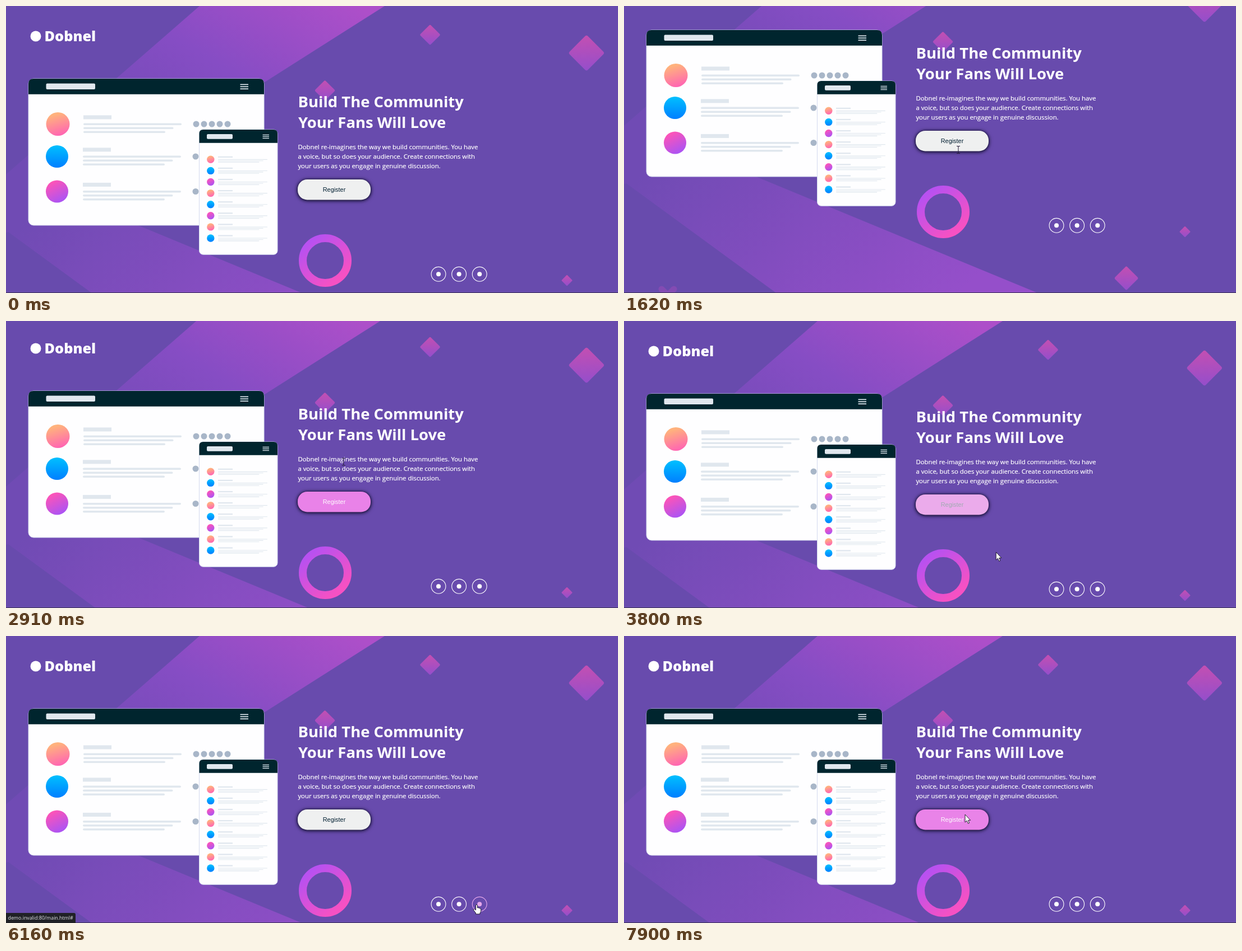
Animation, 1091 px wide and 513 px high, one loop 8000 ms. Source, as an HTML page:

```html
<!DOCTYPE html>
<html lang="en">
<head>
<meta charset="utf-8">
<title>Community landing page</title>
<style>
  html, body { margin: 0; width: 100%; height: 100%; overflow: hidden; background: #684bad; }
  svg { display: block; position: absolute; left: 0; top: 0; }
  text { font-family: "Open Sans", "Noto Sans", sans-serif; fill: #fff; white-space: pre; }
  .title { font-size: 27.45px; font-weight: 700; }
  .copy { font-size: 11.36px; stroke: #fff; stroke-width: .22px; }
  .brand { font-size: 25.3px; font-weight: 800; }
  .status { font-size: 8.8px; fill: #e4e6ea; }
  #label { font-family: "Liberation Sans", Arial, sans-serif; font-size: 10.9px; }
  #button { filter: drop-shadow(0 1px 3px rgba(8, 8, 32, .9)) drop-shadow(0 0 2px rgba(8, 8, 32, .5)); }
</style>
</head>
<body>
<svg width="1091" height="513" viewBox="0 0 1091 513">
  <defs>
    <linearGradient id="bandTop" gradientUnits="userSpaceOnUse" x1="560" y1="-40" x2="330" y2="330">
      <stop offset="0" stop-color="#ad4fc9"/><stop offset=".5" stop-color="#864dc4"/><stop offset="1" stop-color="#704bb4"/>
    </linearGradient>
    <linearGradient id="bandLow" gradientUnits="userSpaceOnUse" x1="90" y1="330" x2="480" y2="720">
      <stop offset="0" stop-color="#704bb4"/><stop offset="1" stop-color="#954fca"/>
    </linearGradient>
    <linearGradient id="gem" x1="0" y1="0" x2="0" y2="1">
      <stop offset="0" stop-color="#c34fb2"/><stop offset="1" stop-color="#954ecb"/>
    </linearGradient>
    <linearGradient id="ring" x1=".15" y1=".1" x2=".8" y2=".9">
      <stop offset="0" stop-color="#b851f0"/><stop offset="1" stop-color="#f651c3"/>
    </linearGradient>
    <linearGradient id="peach" x1=".35" y1="0" x2=".65" y2="1">
      <stop offset=".1" stop-color="#ffb27d"/><stop offset="1" stop-color="#ff62b4"/>
    </linearGradient>
    <linearGradient id="sky" x1="0" y1="0" x2="0" y2="1">
      <stop offset=".05" stop-color="#00bdff"/><stop offset="1" stop-color="#007fff"/>
    </linearGradient>
    <linearGradient id="orchid" x1=".25" y1="0" x2=".75" y2="1">
      <stop offset=".05" stop-color="#ff54b6"/><stop offset="1" stop-color="#a653f8"/>
    </linearGradient>
  </defs>

  <g id="page">
    <path fill="url(#bandTop)" d="M345 0H675L243 275L60 392L0 405V301Z"/>
    <path fill="url(#bandLow)" d="M0 301L40 308L240 394L763 610.5V640H326L0 401Z"/>
    <g id="gems" fill="url(#gem)"></g>
    <path d="M67 593L89 615M89 593L67 615" stroke="#9a4bb8" stroke-width="11" stroke-linecap="round" opacity=".55"/>
    <circle cx="569" cy="455" r="40" fill="none" stroke="url(#ring)" stroke-width="14"/>

    <circle cx="53" cy="54" r="9.5" fill="#fff"/>
    <text class="brand" x="68.5" y="62.6">Dobnel</text>

    <g id="mock"></g>

    <text class="title" x="520.6" y="181">Build The Community</text>
    <text class="title" x="521" y="218.2">Your Fans Will Love</text>
    <text class="copy" x="520.4" y="255.6">Dobnel re-imagines the way we build communities. You have</text>
    <text class="copy" x="520.4" y="272.6">a voice, but so does your audience. Create connections with</text>
    <text class="copy" x="520.4" y="289.6">your users as you engage in genuine discussion.</text>

    <rect id="button" x="520" y="310" width="130" height="36.4" rx="17"/>
    <text id="label" x="585" y="332" text-anchor="middle">Register</text>

    <g id="social"></g>
  </g>

  <path d="M0 512.5H1091" stroke="#3b3356"/>
  <g id="status">
    <path d="M0 495H121Q124 495 124 498V513H0Z" fill="#202126"/>
    <text class="status" x="3.5" y="507.4">demo.invalid:80/main.html#</text>
  </g>

  <g id="cursor">
    <path id="arrow" fill="#fff" stroke="#15101f" stroke-width=".9"
      d="M0 0V14L3.2 11.1L5.4 16.2L7.6 15.2L5.5 10.3H9.6Z"/>
    <path id="beam" fill="none" stroke="#241b38" d="M-3 -6.5H-1Q0 -6.5 0 -5.5Q0 -6.5 1 -6.5H3M0 -6V6M-3 6.5H-1Q0 6.5 0 5.5Q0 6.5 1 6.5H3"/>
    <path id="hand" fill="#fff" stroke="#15101f" stroke-width=".9"
      d="M-1.4 1.2Q0 -.8 1.4 1.2V6Q3.4 4.8 4 6.4Q5.4 5.8 6 7Q7.5 6.7 7.6 8.5V11.5Q7.4 14 6 15V17H-1.5V15Q-4 12 -5.5 9.5Q-5.6 7.8 -3.6 8.2L-1.4 10Z"/>
  </g>
</svg>

<script>
const LOOP = 8000, ENTER = 330, FADE = 500, LAG = 115;
const $ = id => document.getElementById(id);

function add(parent, tag, attrs) {
  const el = document.createElementNS('http://www.w3.org/2000/svg', tag);
  for (const key in attrs) el.setAttribute(key, attrs[key]);
  return parent.appendChild(el);
}
const mock = $('mock');
const box = (x, y, width, height, fill, rx = 0) => add(mock, 'rect', { x, y, width, height, fill, rx });
const dot = (cx, cy, r, fill) => add(mock, 'circle', { cx, cy, r, fill });

const INK = '#00252e', PALE = '#e0e7ee', GREY = '#a8b6c8';
const FILLS = ['url(#peach)', 'url(#sky)', 'url(#orchid)'];

function card(x, y, w, h, head, r) {
  box(x, y, w, h, '#fefeff', r).setAttribute('stroke', '#d3daee');
  add(mock, 'path', { fill: INK, d: `M${x} ${y + head}V${y + r}q0 ${-r} ${r} ${-r}h${w - 2 * r}q${r} 0 ${r} ${r}V${y + head}Z` });
}
function menu(x, y, w, gap, h) {
  for (let i = 0; i < 3; i++) box(x, y + i * gap, w, h, PALE);
}
// Three text lines, each shorter than the one above
function lines(x, y, w, gap, h) {
  for (let i = 0; i < 3; i++) box(x, y + i * gap, w * (1 - i * .083), h, PALE, h / 2);
}

// Desktop window
card(40, 130, 420, 262, 27.7, 9);
box(71.5, 138.5, 87.5, 10.5, PALE, 2);
menu(417.5, 139.5, 14.5, 3.9, 1.7);
[211, 269, 331.5].forEach((y, i) => {
  const x = i ? 137 : 138;
  dot(i ? 91 : 92.5, y, i ? 20 : 21, FILLS[i]);
  box(x, y - 15.6, 50, 7, PALE);
  lines(x, y - 1.6, 175, 7, 3.5);
  for (let n = 0; n < (i ? 1 : 5); n++) dot(x + 201 + n * 14, y, 5.5, GREY);
});

// Phone window
card(344.5, 221, 139.5, 223.3, 23.8, 7);
box(358, 229, 46, 8.8, PALE, 2);
menu(457.5, 229.8, 11.5, 3, 1.3);
for (let i = 0; i < 8; i++) {
  const y = 274.3 + i * 20.1;
  dot(364.8, y, 6.7, FILLS[i % 3]);
  box(378, y - 5.6, 26, 2.3, PALE);
  lines(378, y - .5, 88, 2.4, 1.1);
}

function gem(x, y, r) {
  const c = r * .08, a = r - c;
  add($('gems'), 'path', {
    d: `M${x - c} ${y - a}Q${x} ${y - r} ${x + c} ${y - a}L${x + a} ${y - c}Q${x + r} ${y} ${x + a} ${y + c}` +
       `L${x + c} ${y + a}Q${x} ${y + r} ${x - c} ${y + a}L${x - a} ${y + c}Q${x - r} ${y} ${x - a} ${y - c}Z`
  });
}
gem(756, 51.5, 18.5);
gem(1034.8, 84, 32.5);
gem(568.5, 151, 18.5);
gem(1000, 490.5, 10);
gem(895.5, 573.5, 21.8);

const links = [0, 1, 2].map(i => {
  const cx = 771 + i * 36.6, cy = 479.3, el = add($('social'), 'g', {});
  add(el, 'circle', { cx, cy, r: 12.9, fill: 'none', 'stroke-width': 1.1, stroke: 'currentColor' });
  add(el, 'circle', { cx, cy, r: 4, fill: 'currentColor' });
  return { el, area: [cx - 13.5, 458, 27, 35] };
});

const BUTTON = [520, 310, 130, 36], COPY = [520, 243, 322, 67];

// Where the pointer turns or rests: time, x, y
const STOPS = [
  [330, 1004, 500], [880, 599, 264], [1150, 596, 257], [1690, 596, 257], [2180, 590, 237],
  [2580, 601, 245], [2980, 602, 253], [3110, 606, 314], [3530, 612, 328], [3800, 663, 413],
  [4200, 755, 466], [4550, 755, 466], [5200, 780, 474], [5900, 838, 480], [6160, 839, 480],
  [6980, 768, 478], [7400, 610, 322], [7900, 608, 319]
];

const clamp = p => Math.min(1, Math.max(0, p));
const smooth = (t, start, length) => {
  const p = clamp((t - start) / length);
  return p * p * (3 - 2 * p);
};
const scroll = t => Math.round(87 * (smooth(t, 1415, 205) - smooth(t, 2702, 243)));

function pointer(t) {
  const i = STOPS.findIndex(s => s[0] > t);
  if (i < 1) return STOPS[i ? STOPS.length - 1 : 0].slice(1);
  const [t0, x0, y0] = STOPS[i - 1], [t1, x1, y1] = STOPS[i], p = (t - t0) / (t1 - t0);
  return [x0 + (x1 - x0) * p, y0 + (y1 - y0) * p];
}

// The browser notices what lies under the pointer a little late
function over([x, y, w, h], t) {
  const [px, py] = pointer(t - LAG), dx = px - x, dy = py + scroll(t - LAG) - y;
  return dx >= 0 && dx < w && dy >= 0 && dy < h;
}
function hoverSpans(area) {
  const spans = [];
  let inside = false;
  for (let t = 0; t < LOOP; t += 5) {
    const now = over(area, t);
    if (now && !inside) spans.push([t, LOOP]);
    if (!now && inside) spans[spans.length - 1][1] = t;
    inside = now;
  }
  return spans;
}
const fade = ms => 1 - Math.pow(1 - clamp(ms / FADE), 2.2);
const glow = (spans, t) => Math.max(...spans.map(([on, off]) => fade(Math.min(t, off) - on) * (1 - fade(t - off))));
const mix = (a, b, p) => `rgb(${a.map((v, i) => Math.round(v + (b[i] - v) * p))})`;

const buttonSpans = hoverSpans(BUTTON);
links.forEach(link => link.spans = hoverSpans(link.area));

function draw(t) {
  $('page').setAttribute('transform', `translate(0 ${-scroll(t)})`);

  const h = glow(buttonSpans, t), white = [255, 255, 255];
  $('button').style.fill = mix([239, 240, 240], [233, 130, 232], h);
  $('label').style.fill = mix([0, 30, 48], white, h);
  for (const { el, spans } of links) el.style.color = mix(white, [222, 138, 228], glow(spans, t));
  $('status').style.display = t >= 5400 && t < 7090 ? '' : 'none';

  const shape = links.some(link => over(link.area, t)) ? 'hand' : over(COPY, t) ? 'beam' : 'arrow';
  for (const id of ['arrow', 'beam', 'hand']) $(id).style.display = id === shape ? '' : 'none';
  $('cursor').style.display = t < ENTER ? 'none' : '';
  $('cursor').setAttribute('transform', `translate(${pointer(t).join(' ')})`);
}
function tick() {
  draw(performance.now() % LOOP);
  requestAnimationFrame(tick);
}
tick();
</script>
</body>
</html>
```
